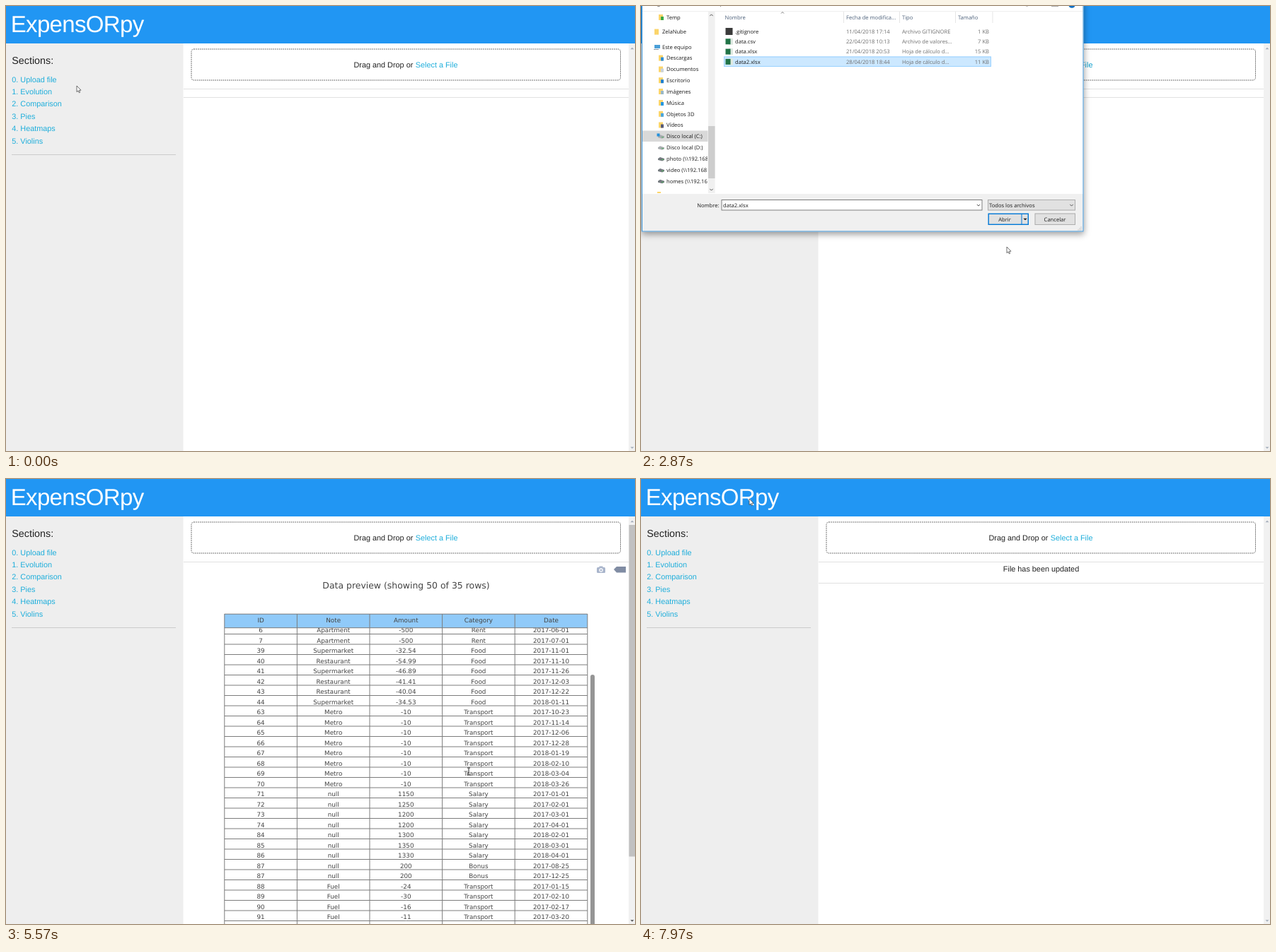
An HTML page with a canvas that plays this animation: 889 by 630 pixels, repeating every 8 s.

```html
<!DOCTYPE html>
<html lang="es">
<head>
<meta charset="utf-8">
<title>ExpensORpy</title>
<style>
html, body { margin: 0; width: 100%; height: 100%; overflow: hidden; background: #fff; }
canvas { display: block; }
</style>
</head>
<body>
<canvas id="stage" width="889" height="630"></canvas>
<script>
const ctx = document.getElementById('stage').getContext('2d');
const layer = document.createElement('canvas').getContext('2d');
layer.canvas.width = 889;
layer.canvas.height = 630;

const LOOP = 8000;
const SANS = '"Liberation Sans", Arial, sans-serif';
const UI = '"Open Sans", "Noto Sans", sans-serif';
const WIDE = '"DejaVu Sans", Verdana, sans-serif';
const LINK = '#1eaedb', LINK_HOVER = '#0fa0ce';

// Page states, in ms
const DIALOG_IN = 1180, DIALOG_OUT = 3330, SELECTED = 2150;
const BUTTON_AT = 3730, TABLE_AT = 4070, UPDATED_AT = 7730;

const cursorPath = [
  [0, 100, 113], [80, 100, 113], [550, 617, 81], [1030, 617, 81], [1320, 544, 110],
  [1800, 400, 75], [2050, 180, 76], [2330, 180, 76], [2870, 517, 341], [3100, 515, 301],
  [3330, 515, 301], [3870, 304, 205], [4100, 262, 180], [4400, 112, 98], [4500, 112, 98],
  [5030, 640, 407], [5340, 640, 407], [5570, 654, 414], [6100, 872, 406], [6800, 872, 406],
  [7350, 575, 601], [7640, 575, 601], [7970, 153, 28], [8000, 153, 28]
];
const pageScroll = [[0, 0], [6130, 0], [6400, 66], [6620, 66], [6800, 107], [8000, 107]];

const clamp = v => Math.max(0, Math.min(1, v));

function track(keys, t) {
  let i = 1;
  while (i < keys.length - 1 && keys[i][0] < t) i++;
  const a = keys[i - 1], b = keys[i];
  const p = clamp((t - a[0]) / (b[0] - a[0]));
  const e = p * p * (3 - 2 * p);
  return a.slice(1).map((v, k) => v + (b[k + 1] - v) * e);
}

function rect(x, y, w, h, color) {
  ctx.fillStyle = color;
  ctx.fillRect(x, y, w, h);
}

function frame(x, y, w, h, fill, stroke, width = 1) {
  rect(x, y, w, h, fill);
  ctx.strokeStyle = stroke;
  ctx.lineWidth = width;
  ctx.strokeRect(x + width / 2, y + width / 2, w - width, h - width);
}

function rounded(x, y, w, h, r) {
  ctx.beginPath();
  ctx.roundRect(x, y, w, h, r);
}

function line(points, color, width = 1) {
  ctx.beginPath();
  points.forEach(([x, y]) => ctx.lineTo(x, y));
  ctx.strokeStyle = color;
  ctx.lineWidth = width;
  ctx.stroke();
}

function shape(points, fill, stroke, width = 0.8) {
  ctx.beginPath();
  points.forEach(([x, y]) => ctx.lineTo(x, y));
  ctx.closePath();
  ctx.fillStyle = fill;
  ctx.fill();
  if (!stroke) return;
  ctx.strokeStyle = stroke;
  ctx.lineWidth = width;
  ctx.stroke();
}

function dot(x, y, r, color) {
  ctx.beginPath();
  ctx.arc(x, y, r, 0, 7);
  ctx.fillStyle = color;
  ctx.fill();
}

function text(str, x, y, font, color, align = 'left', spacing = 0) {
  ctx.font = font;
  ctx.textRendering = 'geometricPrecision';
  ctx.fillStyle = color;
  ctx.textAlign = align;
  ctx.letterSpacing = spacing + 'px';
  ctx.fillText(str, x, y);
}

const triangle = (x, y, r, color) => shape([[x - r, y + r / 2], [x + r, y + r / 2], [x, y - r / 2]], color);
const chevron = (x, y, r, dy, color) => line([[x - r, y - dy], [x, y + dy], [x + r, y - dy]], color);

// --- Table data -----------------------------------------------------------

const rows = [];
for (let i = 1; i <= 7; i++) rows.push([i, 'Apartment', -500, 'Rent', `2017-0${i}-01`]);

function addRows(note, category, list) {
  list.split(' ').forEach(item => {
    const [id, amount, date] = item.split('|');
    rows.push([id, note, amount, category, date]);
  });
}
addRows('Supermarket', 'Food', '39|-32.54|2017-11-01');
addRows('Restaurant', 'Food', '40|-54.99|2017-11-10');
addRows('Supermarket', 'Food', '41|-46.89|2017-11-26');
addRows('Restaurant', 'Food', '42|-41.41|2017-12-03 43|-40.04|2017-12-22');
addRows('Supermarket', 'Food', '44|-34.53|2018-01-11');
for (let i = 0; i < 8; i++) {
  const day = new Date(Date.UTC(2017, 9, 23 + 22 * i));
  rows.push([63 + i, 'Metro', -10, 'Transport', day.toISOString().slice(0, 10)]);
}
addRows('null', 'Salary', '71|1150|2017-01-01 72|1250|2017-02-01 73|1200|2017-03-01 74|1200|2017-04-01 ' +
  '84|1300|2018-02-01 85|1350|2018-03-01 86|1330|2018-04-01');
addRows('null', 'Bonus', '87|200|2017-08-25 87|200|2017-12-25');
addRows('Fuel', 'Transport', '88|-24|2017-01-15 89|-30|2017-02-10 90|-16|2017-02-17 91|-11|2017-03-20 92|-37|2017-03-27');

// --- Web page -------------------------------------------------------------

function drawSidebar() {
  rect(0, 53, 250.5, 577, '#eee');
  text('Sections:', 8.3, 82, '14.3px ' + SANS, '#222');
  ['Upload file', 'Evolution', 'Comparison', 'Pies', 'Heatmaps', 'Violins'].forEach((name, i) =>
    text(`${i}. ${name}`, 8.3, 107.6 + 17.4 * i, '10.85px ' + SANS, LINK));
  rect(8, 210, 232, 1, '#ccc');
}

const rule = y => rect(251, y, 629, 1, '#e1e1e1');

function drawButton(y, hover) {
  rounded(510.5, y + 0.5, 110, 27, 3);
  ctx.fillStyle = '#fff';
  ctx.fill();
  ctx.strokeStyle = hover ? '#888' : '#bbb';
  ctx.lineWidth = 1;
  ctx.stroke();
  text('USE THIS FILE', 565.8, y + 16.8, 'bold 7.6px ' + SANS, hover ? '#333' : '#555', 'center', 0.95);
}

function drawModebar() {
  const c = '#a9b5cc';
  rounded(835, 125, 12, 8, 1.5);
  ctx.fillStyle = c;
  ctx.fill();
  rect(838.5, 123.5, 5, 2, c);
  dot(841, 129, 2.7, '#fff');
  dot(841, 129, 1.5, c);
  shape([[859, 128], [863, 124], [876, 124], [876, 132.5], [863, 132.5]], '#808ca3');
}

function drawTable(t) {
  const left = 308.8, colW = 102.6, right = left + colW * 5;
  const top = 211, rowH = 14.5, viewH = 429;
  const offset = t < 5110 ? 0 : t < 5190 ? 66 : rows.length * rowH - viewH;
  const font = '8.8px ' + WIDE, ink = '#444', grid = '#7c7c7c';
  const colX = c => left + colW * (c + 0.5);

  text('Data preview (showing 50 of 35 rows)', 565.5, 154.5, '12.45px ' + WIDE, ink, 'center');
  drawModebar();

  ctx.save();
  ctx.beginPath();
  ctx.rect(left - 1, top, colW * 5 + 2, viewH + 0.5);
  ctx.clip();
  rows.forEach((row, i) => {
    const y = top + i * rowH - offset;
    line([[left, y + rowH], [right, y + rowH]], grid);
    row.forEach((cell, c) => text(String(cell), colX(c), y + 12.2, font, ink, 'center'));
  });
  ctx.restore();

  rect(left, 191, colW * 5, 20, '#90caf9');
  line([[left, 191.2], [right, 191.2]], grid);
  line([[left, 210.7], [right, 210.7]], grid);
  for (let c = 0; c <= 5; c++) {
    const x = left + colW * c;
    line([[x, 191], [x, top + viewH]], grid);
  }
  ['ID', 'Note', 'Amount', 'Category', 'Date'].forEach((name, c) =>
    text(name, colX(c), 203.2, font, ink, 'center'));

  rounded(826, top + offset * 66 / 78.5, 6, 363, 3);
  ctx.fillStyle = '#959595';
  ctx.fill();
}

function drawScrollbar(hasTable, scroll) {
  rect(880, 53, 9, 577, '#f1f1f1');
  const on = '#505050', off = '#a3adba';
  triangle(885, 60, 2.5, hasTable && scroll > 0 ? on : off);
  triangle(885, 625.5, -2.5, hasTable && scroll < 107 ? on : off);
  if (hasTable) rect(880.5, 65 + scroll * 0.803, 8.5, 469.5, '#c1c1c1');
}

function drawPage(t) {
  rect(0, 0, 889, 630, '#fff');
  const hasTable = t >= TABLE_AT && t < UPDATED_AT;
  const scroll = hasTable ? track(pageScroll, t)[0] : 0;

  ctx.save();
  ctx.beginPath();
  ctx.rect(251, 53, 629, 577);
  ctx.clip();
  ctx.translate(0, -scroll);

  ctx.setLineDash([1.6, 1.2]);
  rounded(262, 61, 606.5, 44, 3.5);
  ctx.strokeStyle = '#555';
  ctx.lineWidth = 1;
  ctx.stroke();
  ctx.setLineDash([]);
  const linkHover = t > 520 && t < 3500;
  text('Drag and Drop or ', 491.5, 86.6, '10.85px ' + SANS, '#222');
  text('Select a File', 578.8, 86.6, '10.85px ' + SANS, linkHover ? LINK_HOVER : LINK);
  rule(117);

  if (hasTable) {
    drawTable(t);
    drawButton(697, t > 7350);
    rule(736);
  } else if (t >= UPDATED_AT) {
    text('File has been updated', 565.5, 130.8, '10.85px ' + SANS, '#222', 'center');
    rule(147);
  } else if (t >= BUTTON_AT) {
    drawButton(118, false);
    rule(156);
  } else {
    rule(129);
  }
  ctx.restore();

  drawSidebar();
  drawScrollbar(hasTable, scroll);
  rect(0, 0, 889, 53, '#2196f3');
  text('ExpensORpy', 6.7, 37.3, '33px ' + SANS, '#fff', 'left', -0.66);
}

// --- File dialog ----------------------------------------------------------

const places = [
  ['Temp', 16, '#3aa845'], ['ZelaNube', 36.6, ''], ['Este equipo', 58, 'pc'], ['Descargas', 73.6, '#2d8fd8'],
  ['Documentos', 89.6, '#c9d3dc'], ['Escritorio', 105.2, '#1f7fd0'], ['Imágenes', 121, '#9ab8c8'],
  ['Música', 137, '#2496e0'], ['Objetos 3D', 152.8, '#4aa5dd'], ['Vídeos', 168.5, '#555a78'],
  ['Disco local (C:)', 184.3, 'drive'], ['Disco local (D:)', 200.2, 'drive'],
  ['photo (\\\\192.168', 216, 'net'], ['video (\\\\192.168', 232, 'net'], ['homes (\\\\192.168', 247.8, 'net']
];
const files = [
  ['.gitignore', '11/04/2018 17:14', 'Archivo GITIGNORE', '1 KB', '#3b3b3b'],
  ['data.csv', '22/04/2018 10:13', 'Archivo de valores...', '7 KB', '#217346'],
  ['data.xlsx', '21/04/2018 20:53', 'Hoja de cálculo d...', '15 KB', '#217346'],
  ['data2.xlsx', '28/04/2018 18:44', 'Hoja de cálculo d...', '11 KB', '#217346']
];
const label = (str, x, y, color = '#1a1a1a', align = 'left') => text(str, x, y + 2.7, '7.6px ' + UI, color, align);

function placeIcon(kind, x, y) {
  if (kind === 'pc') {
    rect(x + 1, y - 3, 8, 5, '#4a9fd8');
    rect(x, y + 3, 7, 1, '#8695a3');
  } else if (kind === 'drive' || kind === 'net') {
    shape([[x, y], [x + 3, y - 2], [x + 9, y], [x + 9, y + 2], [x + 6, y + 3.5], [x, y + 2]], kind === 'net' ? '#757b80' : '#a9adb0');
    rect(x + 5, y + 1, 3, 1, '#52b060');
  } else {
    rect(x + 1, y - 4, 6, 8, '#fbd56b');
    if (kind) rect(x + 4, y - 1, 4, 5, kind);
  }
}

function drawPlaces() {
  rect(2, 176.5, 92.5, 15.5, '#d9d9d9');
  ctx.save();
  ctx.beginPath();
  ctx.rect(2, 8, 92, 257);
  ctx.clip();
  places.forEach(([name, y, kind], i) => {
    const indent = i === 1 || i === 2 ? 30 : 36;
    placeIcon(kind, indent - 12, y);
    label(name, indent, y);
  });
  rect(23, 263, 5, 2, '#fbd56b');
  ctx.restore();
  rect(22.5, 180.5, 4, 4, '#2591dc');
  rect(95, 8, 9.5, 257, '#f0f0f0');
  rect(95, 170, 9.5, 74, '#cdcdcd');
  chevron(99.5, 13, 2.2, -1.1, '#555');
  chevron(99.5, 260, 2.2, 1.1, '#555');
}

function drawFiles(t, cx, cy) {
  [286, 365, 444, 496.5].forEach(x => rect(x, 8, 1, 16, '#e5e5e5'));
  chevron(200, 9.5, 2, -1, '#777');
  [['Nombre', 118.5], ['Fecha de modifica...', 290], ['Tipo', 369], ['Tamaño', 448]]
    .forEach(([name, x]) => label(name, x, 16, '#4c607a'));

  const hovered = t > 1500 && cx > 117 && cx < 495 ? Math.floor((cy - 28.7) / 14.3) : -1;
  files.forEach(([name, date, type, size, color], i) => {
    const y = 36 + 14.3 * i, top = y - 7.4;
    if (i === 3 && t > SELECTED) frame(117, top, 378, 14.5, '#cce8ff', '#99d1ff');
    else if (i === hovered) rect(117, top, 378, 14.5, '#e5f3ff');
    if (i) rect(124, y - 4.5, 6, 9, '#dfe9e2');
    rect(119.5, y - (i ? 4 : 5), i ? 7 : 10, i ? 8 : 10, color);
    label(name, 133, y);
    label(date, 290, y, '#6d6d6d');
    label(type, 369, y, '#6d6d6d');
    label(size, 492, y, '#6d6d6d', 'right');
  });
}

function drawControls(t, cx, cy) {
  rect(2, 266, 623, 53, '#f0f0f0');
  label('Nombre:', 110.5, 282, '#1a1a1a', 'right');
  const picked = t > SELECTED;
  frame(113.5, 274, 369, 15.5, '#fff', picked ? '#7a7a7a' : '#0078d7');
  chevron(477, 282, 2.2, 1.1, '#555');
  if (picked) label('data2.xlsx', 116, 282);
  else rect(116, 276.5, 0.8, 10.5, '#222');
  frame(490, 274, 124, 15.5, '#e1e1e1', '#adadad');
  label('Todos los archivos', 492, 282);
  chevron(608.5, 282, 2.2, 1.1, '#555');

  const hover = cx > 491 && cx < 547 && cy > 293 && cy < 310;
  frame(490.5, 293.5, 57.5, 16.5, hover ? '#e5f1fb' : '#e1e1e1', '#0078d7', 1.4);
  rect(537.5, 294, 1, 15.5, '#0078d7');
  label('Abrir', 514, 302, '#1a1a1a', 'center');
  triangle(543, 302, -2.7, '#111');
  frame(556.5, 293.5, 57.5, 16.5, '#e1e1e1', '#adadad');
  label('Cancelar', 585, 302, '#1a1a1a', 'center');
  for (let i = 0; i < 3; i++)
    for (let j = 0; j <= i; j++) rect(621.5 - 2 * j, 312.5 + 2 * i, 1, 1, '#aaa');
}

function drawDialog(t, cx, cy) {
  if (t < DIALOG_IN || t > DIALOG_OUT + 200) return;
  const p = t < DIALOG_OUT ? clamp((t - DIALOG_IN) / 205) : 1 - clamp((t - DIALOG_OUT) / 200);
  const ease = 1 - (1 - p) ** 2;
  // Keep the bare page, so that it can be blended back while the dialog fades.
  layer.drawImage(ctx.canvas, 0, 0);

  ctx.save();
  const scale = 0.95 + 0.05 * ease;
  ctx.translate(313, 120);
  ctx.scale(scale, scale);
  ctx.translate(-313, -120);
  ctx.shadowColor = 'rgba(0,0,0,0.4)';
  ctx.shadowBlur = 9;
  ctx.shadowOffsetY = 3;
  rect(1, -60, 624.5, 379.5, '#fff');
  ctx.shadowColor = 'transparent';
  label('Organizar', 14, -4);
  label('Nueva carpeta', 76, -4);
  dot(609, -2, 4.8, '#0b6fc4');
  rect(580, -4, 10, 4.6, '#777');
  rect(544, -1, 3, 1.5, '#999');
  rect(2, 7, 622, 0.8, '#ececec');
  drawPlaces();
  drawFiles(t, cx, cy);
  drawControls(t, cx, cy);
  ctx.strokeStyle = '#3c94d8';
  ctx.lineWidth = 1;
  ctx.strokeRect(1.5, -60, 623.5, 379);
  ctx.restore();

  ctx.globalAlpha = 1 - ease;
  ctx.drawImage(layer.canvas, 0, 0);
  ctx.globalAlpha = 1;
}

// --- Cursor ---------------------------------------------------------------

function drawCursor(t, x, y) {
  const onLink = t > 520 && t < 1060;
  const onButton = t > 7330 && t < 7660;
  const onTable = t > TABLE_AT && t < 6300 && x > 309 && x < 822 && y > 191;
  ctx.save();
  ctx.translate(x, y);
  if (onLink || onButton) {
    shape([[0, 0], [1.4, 0], [1.5, 4], [6, 5], [6.5, 8], [5.3, 11], [0.6, 11], [-2.6, 6.5], [-1.6, 6], [0, 7.4]], '#fff', '#111');
  } else if (onTable) {
    line([[0, -4.5], [0, 4.5]], '#222');
    line([[-2, -5], [2, -5]], '#222');
    line([[-2, 5], [2, 5]], '#222');
  } else {
    shape([[0, 0], [0, 8.6], [2, 6.9], [3.3, 9.8], [4.6, 9.2], [3.4, 6.4], [6, 6.2]], '#fff', '#333', 0.7);
  }
  ctx.restore();
}

function render() {
  const t = performance.now() % LOOP;
  const [x, y] = track(cursorPath, t);
  drawPage(t);
  drawDialog(t, x, y);
  drawCursor(t, x, y);
  requestAnimationFrame(render);
}
render();
</script>
</body>
</html>
```
